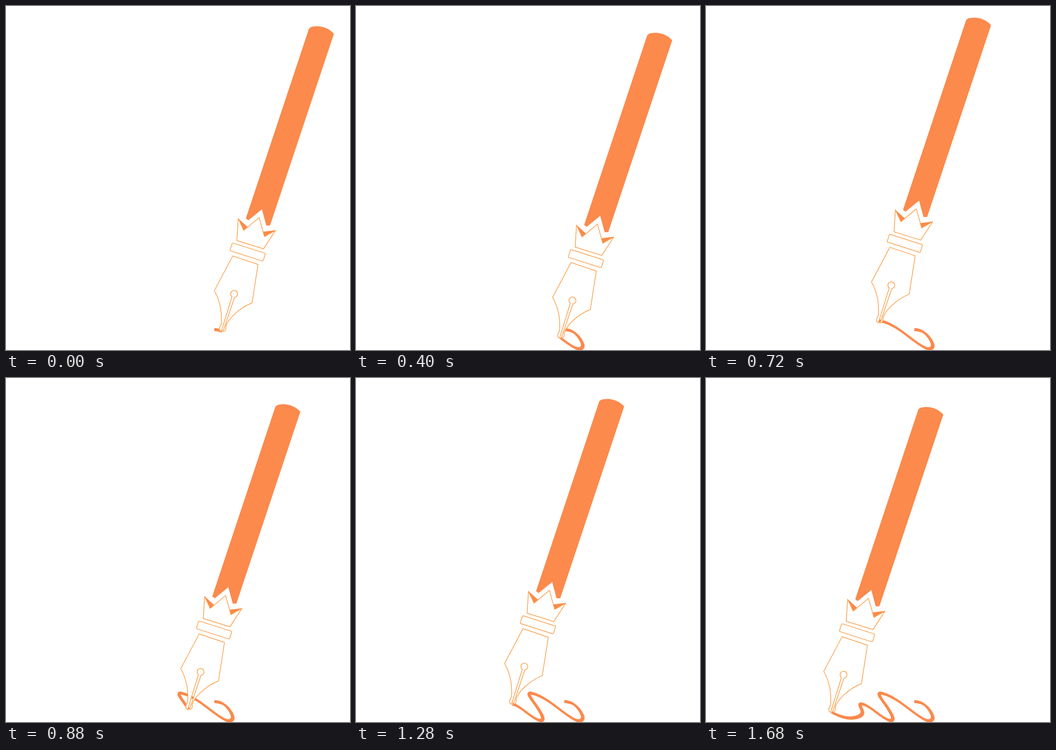
These frames come from a looping animation (748x748 px, 1.76 s). An HTML page:

```html
<!DOCTYPE html>
<html lang="en">
<head>
<meta charset="utf-8">
<title>Fountain pen</title>
<style>
  html, body { margin: 0; width: 100%; height: 100%; overflow: hidden; background: #fff; }
  svg { display: block; width: 100%; height: 100%; }
  .solid { fill: #fb8a4c; }
  .line { fill: #fff; stroke: #fb9e48; stroke-width: 1.5; stroke-linejoin: round; }
</style>
</head>
<body>
<svg viewBox="0 0 748 748">
  <path id="ink" class="solid"/>
  <g id="pen">
    <path class="solid" d="M658.500 50Q661 44 676 44Q699 44.500 713 60.500L574 477.500H566L556.500 442L527 466L521.500 462Z"/>
    <path class="solid" d="M505 462L525.500 480.500L517 488ZM558 491L586 487.500L562 502Z"/>
    <path class="line" d="M505 462L517 488L550.500 460L562 501.500L586 488L560 528L502 510Z"/>
    <rect class="line" x="-37.800" y="-8.900" width="75.600" height="17.800" rx="2" transform="translate(525.500 535) rotate(17.700)"/>
    <path class="line" d="M493 543.500L453 619C466 642 470 665 468 692Q462 701 465 706L468 708L491.500 632A7.500 7.500 0 1 1 497 633.500L472 707.500Q477 708 478 702V697C482 682 505 658 535 645.500L548 562Z"/>
  </g>
</svg>
<script>
const STEP = 80, FRAMES = 22, SUB = 12;
const NIB = 36 * Math.PI / 180; // angle at which the nib writes thinnest
const START = "453 703.5";

// Each leg of the flourish: steps it takes, and its curve
const legs = [
  [1, "Q462 704 470 707.5"],
  [3, "C484 715 493 732 493 738C493 745 486 746.5 480 744.5"],
  [4, "C462 738 432 710 410 697.5"],
  [4, "C392 687 378 683 377 687C375 692 389 707 397 720.5"],
  [3, "C405 733 410 744 402 744.5C394 745 380 734 371 727.5"],
  [5, "C355 715 343 708 337 709C331 710 341 721 340 728C339 735 328 739 314 739.5"],
  [2, "C300 739 286 734 273 726.5"]
];

// Samples along the flourish, SUB per step, at even speed within a leg
function trace() {
  const path = document.createElementNS("http://www.w3.org/2000/svg", "path");
  const points = [];
  let from = START;
  for (const [steps, curve] of legs) {
    path.setAttribute("d", `M${from}${curve}`);
    const count = steps * SUB, length = path.getTotalLength();
    for (let i = points.length ? 1 : 0; i <= count; i++) {
      points.push(path.getPointAtLength(length * i / count));
    }
    from = curve.split(" ").slice(-2).join(" ");
  }
  return points;
}

const points = trace();
const rest = points[SUB];

// The two edges of the ink at each sample; width follows the direction
const edges = points.map((p, i) => {
  const a = points[Math.max(0, i - 1)];
  const b = points[Math.min(points.length - 1, i + 1)];
  const dir = Math.atan2(b.y - a.y, b.x - a.x);
  const half = 2.4 + 2 * Math.abs(Math.sin(dir - NIB));
  const dx = -Math.sin(dir) * half, dy = Math.cos(dir) * half;
  return [1, -1].map(s => `${(p.x + s * dx).toFixed(2)} ${(p.y + s * dy).toFixed(2)}`);
});

const ink = document.getElementById("ink");
const pen = document.getElementById("pen");

function draw(ms) {
  const end = (Math.floor(ms / STEP) % FRAMES + 1) * SUB;
  const drawn = edges.slice(0, end + 1);
  const outline = [...drawn.map(e => e[0]), ...drawn.map(e => e[1]).reverse()];
  const tip = points[end];
  ink.setAttribute("d", `M${outline.join("L")}Z`);
  pen.setAttribute("transform", `translate(${tip.x - rest.x} ${tip.y - rest.y})`);
}

const start = performance.now();
function tick() {
  draw(performance.now() - start);
  requestAnimationFrame(tick);
}
tick();
</script>
</body>
</html>
```
